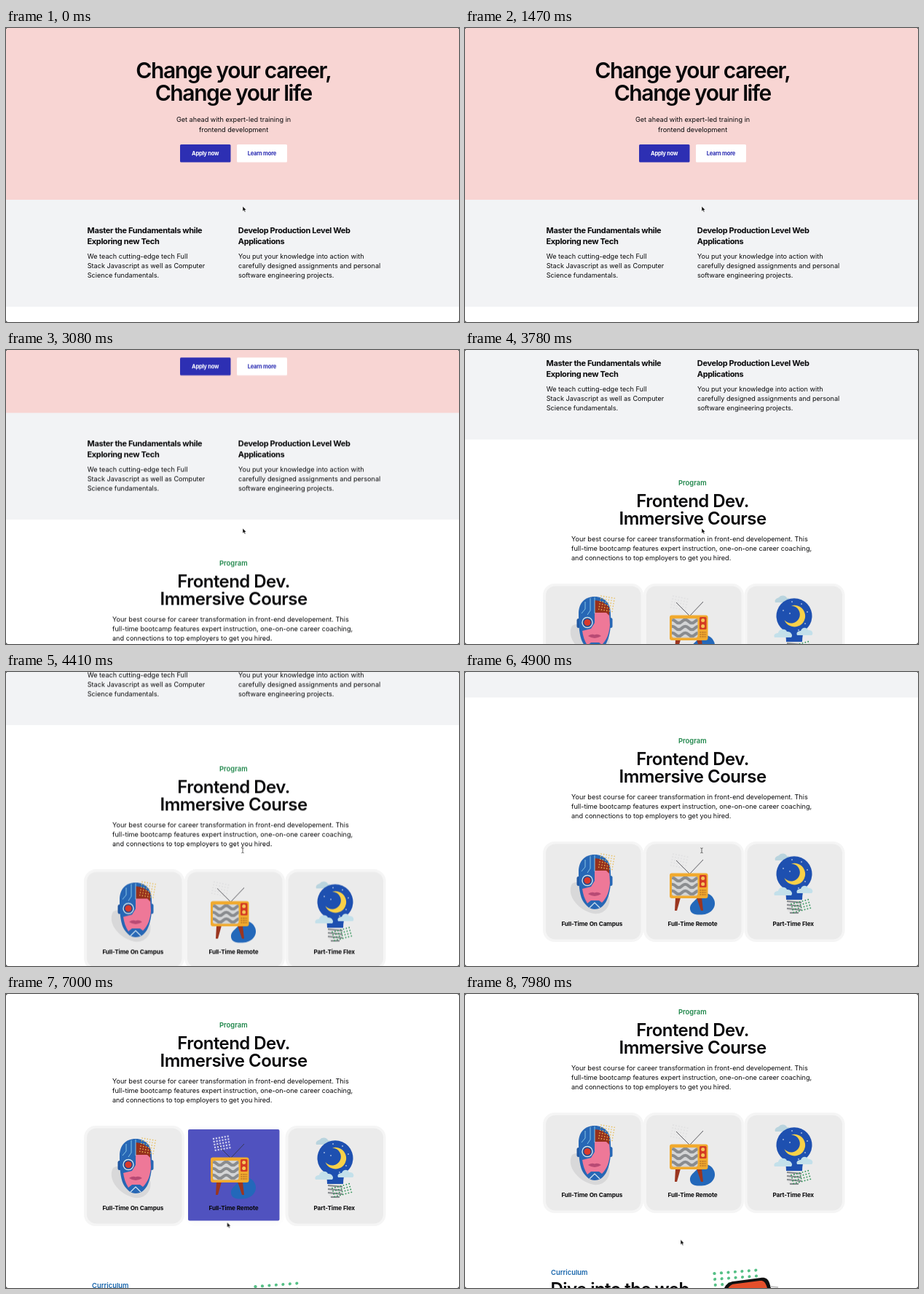
Animation, 622 px wide and 404 px high, one loop 8 s. Source, as an HTML page:

```html
<!DOCTYPE html>
<html lang="en">
<head>
<meta charset="utf-8">
<title>Course landing page</title>
<style>
  html, body { margin: 0; width: 100%; height: 100%; overflow: hidden; background: #333; }
  svg { display: block; width: 622px; height: 404px; background: #fff; border-radius: 3px; }
  text { font-family: Inter, "Open Sans", sans-serif; font-optical-sizing: none; fill: #08080a; }
  .mid { text-anchor: middle; }
  .h1 { font-size: 30px; font-weight: 600; letter-spacing: -1.4px; }
  .h2 { font-size: 24px; font-weight: 600; letter-spacing: -.55px; }
  .h3 { font-size: 11px; font-weight: 700; letter-spacing: -.35px; }
  .body { font-size: 9.14px; }
  .btn { font-size: 7.6px; font-weight: 700; letter-spacing: -.26px; }
  .tag { font-size: 9.4px; font-weight: 600; }
  .label { font-size: 8.2px; font-weight: 700; letter-spacing: -.1px; }
  .white { fill: #fff; }
  .indigo { fill: #2d2fb3; }
  .green { fill: #1c8548; }
  .blue { fill: #1664ab; }

  #page { animation: scroll 8s linear infinite; }
  @keyframes scroll {
    0% { transform: translateY(0); }
    27.4% { transform: translateY(0); animation-timing-function: cubic-bezier(.4, 0, .8, .7); }
    31.5% { transform: translateY(-34.5px); }
    38.5% { transform: translateY(-149.5px); }
    47.25% { transform: translateY(-260px); }
    61.25% { transform: translateY(-348px); }
    70%, 90.25% { transform: translateY(-400px); animation-timing-function: cubic-bezier(.3, .2, .6, 1); }
    99.75%, 100% { transform: translateY(-418px); }
  }

  .on { animation: hover 8s linear infinite; }
  .off { animation: rest 8s linear infinite; }
  @keyframes hover { 0%, 64.75% { opacity: 0; } 67.5%, 87% { opacity: 1; } 90%, 100% { opacity: 0; } }
  @keyframes rest { 0%, 64.75% { opacity: 1; } 67.5%, 87% { opacity: 0; } 90%, 100% { opacity: 1; } }

  #cursor { animation: point 8s ease-in-out infinite; }
  @keyframes point {
    0%, 64% { transform: translate(325px, 245px); }
    67%, 82.5% { transform: translate(325px, 246px); }
    90.25%, 100% { transform: translate(296px, 337.5px); }
  }
  #arrow { animation: arrow 8s step-end infinite; }
  #beam { animation: beam 8s step-end infinite; }
  #hand { animation: hand 8s step-end infinite; }
  @keyframes arrow { 0% { opacity: 1; } 48.1% { opacity: 0; } 87% { opacity: 1; } }
  @keyframes beam { 0% { opacity: 0; } 48.1% { opacity: 1; } 64.75% { opacity: 0; } }
  @keyframes hand { 0% { opacity: 0; } 64.75% { opacity: 1; } 87% { opacity: 0; } }
</style>
</head>
<body>
<svg viewBox="0 0 622 404">
  <defs>
    <clipPath id="head"><path d="M178 251C164 251 156 260 156 275C156 291 157 304 161 313C166 322 172 326 178 326C185 326 191 322 195 313C199 304 201 291 200 275C200 260 192 251 178 251Z"/></clipPath>
    <clipPath id="screen"><rect x="284" y="281" width="35.5" height="26.5" rx="3"/></clipPath>
    <g id="panel">
      <rect x="107" y="233" width="138" height="138" rx="16" fill="#f5f5f5"/>
      <rect x="111" y="236.5" width="130.5" height="131" rx="13" fill="#ebebeb"/>
    </g>
  </defs>

  <g id="page">
    <rect width="622" height="236" fill="#f8d5d3"/>
    <rect y="236" width="622" height="147" fill="#f2f3f5"/>
    <rect class="indigo" x="239" y="160" width="69.5" height="24.5" rx="1.5"/>
    <rect class="white" x="317" y="160" width="69" height="24.5" rx="1.5"/>

    <g transform="translate(0 348)">
      <use href="#panel"/>
      <use href="#panel" x="138" class="off"/>
      <use href="#panel" x="276.5"/>
      <rect class="indigo on" x="250" y="238" width="125.5" height="125.5" rx="2"/>

      <!-- face -->
      <path d="M147 291C158 284 190 291 197 305C203 322 190 334 177 332C158 329 138 308 147 291Z" fill="#d8d8d9"/>
      <rect x="153.500" y="281" width="5" height="13" rx="2.500" fill="#1f559f"/>
      <rect x="197.500" y="280" width="5" height="14" rx="2.500" fill="#2767b5"/>
      <g clip-path="url(#head)">
        <rect x="150" y="248" width="55" height="80" fill="#2767b5"/>
        <path d="M178 272H198L199 290C198 303 194 311 188 317L184 314H173L168 318C164 312 162 305 161 298L173 295L178 287Z" fill="#ee7898"/>
        <path d="M178 256Q190 256 198 266V277L194 273H178Z" fill="#96301c"/>
        <path d="M178 252V274M172 253V270L168 276M165 258V268L160 274" fill="none" stroke="#86c5e6" stroke-width="1"/>
        <path d="M171 324L178 317L185 324" fill="none" stroke="#d5e8f2" stroke-width="1.200"/>
        <path d="M169 305Q174 301.500 178 303.500Q182 301.500 187 305Q178 311 169 305Z" fill="#b84a74"/>
      </g>
      <circle cx="168" cy="286.500" r="7" fill="#1c4a92" stroke="#cfe5ee" stroke-width="1.400"/>
      <circle cx="168" cy="286.500" r="4.600" fill="#d93a2c"/>
      <g id="faceDots"></g>

      <!-- television -->
      <path d="M309 326C308 318 316 315 320 309C325 301 338 303 342 313C346 323 338 333 325 333.500C317 334 310 333 309 326Z" fill="#2368ba"/>
      <path d="M289 310H296L291 328H288ZM318 310H325L327 328H324Z" fill="#9b3620"/>
      <path d="M308 277L290 259M309 277L327 258" stroke="#33333a" stroke-width=".8"/>
      <rect x="281" y="276.500" width="52.500" height="34.500" rx="3" fill="#f1aa2e"/>
      <g clip-path="url(#screen)">
        <rect x="284" y="281" width="36" height="27" fill="#d4d5d6"/>
        <g id="waves" fill="none" stroke="#8a8c8f" stroke-width="4"></g>
      </g>
      <rect x="322" y="279" width="9.500" height="17" rx="1.500" fill="#d43b22"/>
      <circle cx="326.700" cy="283.500" r="2.500" fill="#f6c65a"/>
      <circle cx="326.700" cy="291.500" r="2.500" fill="#f6c65a"/>
      <path d="M322.500 300H331M322.500 303H331M322.500 306H331" stroke="#8f4a1d" stroke-width="1" stroke-dasharray="1.500 1"/>
      <g id="tvDots" class="off"></g>
      <g id="tvDotsOn" class="on"></g>

      <!-- bulb -->
      <path d="M426 259C424 254 430 253 431 252C434 248 441 249 442 253C448 253 449 259 445 259Z" fill="#b9d4de"/>
      <path d="M437 297A24.500 24.500 0 1 1 467 297Q463 302 463 313H441Q441 302 437 297Z" fill="#1e50b0"/>
      <path d="M448 263.500A14.800 14.800 0 1 1 438.500 283A12 12 0 1 0 448 263.500Z" fill="#f9d148"/>
      <g id="stars" fill="#fff"></g>
      <path d="M425 307C423 303 427 301 430 301C431 295 440 294 442 299C447 298 451 304 448 307Z" fill="#c3e0ea"/>
      <path d="M456 304C454 300 458 298 461 298C463 292 470 293 471 297C477 296 479 302 476 304Z" fill="#c3e0ea"/>
      <path d="M442 313H462V327L457 333H447L442 327Z" fill="#e3e3e3"/>
      <path d="M442 315L462 317M442 320L462 322M442 325L462 327M446 331H458" stroke="#85898d" stroke-width="1.800"/>
      <g id="bulbDots"></g>
    </g>

    <!-- curriculum art -->
    <g id="artDots"></g>
    <g transform="translate(0 418)">
      <path d="M354 412C355 402 360 396 368 395L406 390C412 389 416 391 418 397L423 414H354Z" fill="#111"/>
      <path d="M359 412C360 404 364 399 370 398.500L405 394C410 393.500 412 396 414 401L418 414Z" fill="#e44f2b"/>
      <path d="M419 402L430 403" stroke="#b7b7b7" stroke-width="1.500"/>
    </g>
  </g>

  <g id="cursor">
    <path id="arrow" d="M0 0V7L1.600 5.500L2.800 8L4 7.400L2.900 5.100H5Z" fill="#111" stroke="#fff" stroke-width=".5"/>
    <path id="beam" d="M-1.700 -3.200Q0 -3.200 0 -2V2.500Q0 3.700 -1.700 3.700M1.700 -3.200Q0 -3.200 0 -2M0 2.500Q0 3.700 1.700 3.700" fill="none" stroke="#444" stroke-width=".8"/>
    <path id="hand" d="M-.8 .2Q0 -.8 .9 .2V3L4 3.800Q5 4.200 4.600 6L3.800 8.500H-.6L-3 5.200Q-2.600 4 -.8 5.200Z" fill="#fff" stroke="#111" stroke-width=".8"/>
  </g>
</svg>

<script>
  const $ = id => document.getElementById(id);
  const add = (parent, tag, attrs) => {
    const el = document.createElementNS("http://www.w3.org/2000/svg", tag);
    for (const key in attrs) el.setAttribute(key, attrs[key]);
    return parent.appendChild(el);
  };

  function write(cls, x, y, pitch, ...lines) {
    lines.forEach((line, i) => {
      add($("page"), "text", { class: cls, x, y: y + i * pitch }).textContent = line;
    });
  }

  // Grid of dots, tilted around its first dot.
  function dots(id, x, y, cols, rows, step, angle, r, fill, rowStep = step) {
    const g = add($(id), "g", { fill, transform: `translate(${x} ${y}) rotate(${angle})` });
    for (let i = 0; i < cols * rows; i++)
      add(g, "circle", { cx: i % cols * step, cy: Math.floor(i / cols) * rowStep, r });
  }

  write("h1 mid", 312.3, 68.5, 31, "Change your career,", "Change your life");
  write("body mid", 312.6, 129, 13.6, "Get ahead with expert-led training in", "frontend development");
  write("btn mid white", 273.6, 175, 0, "Apply now");
  write("btn mid indigo", 351.4, 175, 0, "Learn more");
  write("h3", 111.5, 282, 14.7, "Master the Fundamentals while", "Exploring new Tech");
  write("h3", 318.8, 282, 14.7, "Develop Production Level Web", "Applications");
  write("body", 111.7, 316.5, 13, "We teach cutting-edge tech Full", "Stack Javascript as well as Computer", "Science fundamentals.");
  write("body", 319, 316.5, 13, "You put your knowledge into action with", "carefully designed assignments and personal", "software engineering projects.");
  write("tag mid green", 312.3, 445.8, 0, "Program");
  write("h2 mid", 312.6, 475.5, 24.2, "Frontend Dev.", "Immersive Course");
  write("body", 146, 523, 13, "Your best course for career transformation in front-end developement. This",
    "full-time bootcamp features expert instruction, one-on-one career coaching,",
    "and connections to top employers to get you hired.");
  ["Full-Time On Campus", "Full-Time Remote", "Part-Time Flex"].forEach((name, i) =>
    write("label mid", 174.3 + 138.2 * i, 697.4, 0, name));
  write("tag blue", 118, 804.3, 0, "Curriculum");
  write("h2", 117.5, 831.5, 0, "Dive into the web");

  dots("faceDots", 187, 250, 6, 6, 3.7, 10, .8, "#e9bd55");
  dots("tvDots", 286, 250, 6, 5, 4, 12, .55, "#c4c4c8");
  dots("tvDotsOn", 285, 251, 6, 5, 4, -10, 1.15, "#fff");
  dots("bulbDots", 448, 319, 7, 4, 4, -15, .95, "#2f9257");
  dots("artDots", 342.5, 802, 7, 4, 9.5, -4.5, 2.1, "#55c086", 8);

  for (let y = 285; y < 312; y += 9)
    add($("waves"), "path", { d: `M280 ${y}q4.500 -4.500 9 0t9 0t9 0t9 0t9 0` });
  [[437, 270], [449, 258], [462, 261], [470, 272], [446, 274], [467, 288], [458, 297]].forEach(([cx, cy]) =>
    add($("stars"), "circle", { cx, cy, r: .8 }));
</script>
</body>
</html>
```
